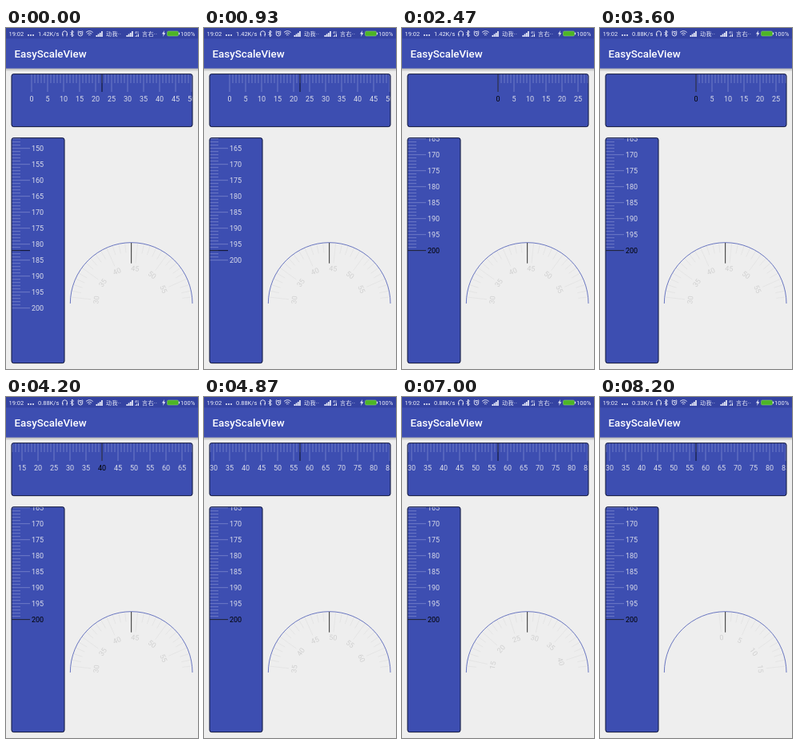
Write an HTML page that moves like this. It is 240 px wide and 427 px high and loops after 8870 ms.

```html
<!DOCTYPE html>
<html lang="en">
<head>
<meta charset="utf-8">
<title>EasyScaleView</title>
<style>
html, body { margin: 0; width: 100%; height: 100%; overflow: hidden; background: #eee; }
svg { display: block; width: 100%; height: 100%; font: 9px Roboto, sans-serif; }
.panel { fill: #3d4eb1; }
.frame { fill: none; stroke: #000; stroke-width: .67; }
.status { font-size: 7.5px; fill: #eceefa; }
.cjk { font-family: Roboto, "Noto Sans CJK SC", "Noto Sans CJK", sans-serif; font-size: 7px; letter-spacing: .4px; }
.icon { fill: none; stroke: #eceefa; stroke-width: .9; }
.ruler line { stroke: #8792d3; stroke-width: .67; }
.ruler text { fill: #dcdeeb; }
.dial line { stroke: #dcdcdc; stroke-width: .5; }
.dial text { fill: #d0d0d0; }
g.on text { fill: #000; }
.needle { stroke: #000; stroke-width: .8; }
</style>
</head>
<body>
<svg viewBox="0 0 240 427">
  <defs>
    <linearGradient id="shade" x2="0" y2="1">
      <stop stop-color="#000" stop-opacity=".24"/><stop offset="1" stop-color="#000" stop-opacity="0"/>
    </linearGradient>
    <clipPath id="clipH"><rect x="6.67" y="57.33" width="226.67" height="66.67" rx="3"/></clipPath>
    <clipPath id="clipV"><rect x="6.67" y="137.33" width="66.67" height="282.67" rx="3"/></clipPath>
    <clipPath id="clipD"><rect x="79" y="267" width="156" height="79"/></clipPath>
  </defs>

  <rect width="240" height="50.67" fill="#3d4eb1"/>
  <rect width="240" height="13.33" fill="#3443a2"/>
  <rect y="50.67" width="240" height="4" fill="url(#shade)"/>
  <text x="10.5" y="37" font-size="13.33" font-weight="500" fill="#fff">EasyScaleView</text>

  <g class="status">
    <text x="3.5" y="10">19:02</text>
    <circle cx="28" cy="9" r="1"/><circle cx="31" cy="9" r="1"/><circle cx="34" cy="9" r="1"/>
    <text x="40" y="10" id="speed"></text>
    <g class="icon">
      <path d="M70.5 9V7a3 3.2 0 0 1 6 0v2M71 7.5v3M76 7.5v3"/>
      <path d="M80.5 5l4 4-2 2V3l2 2-4 4"/>
      <circle cx="93" cy="7.2" r="2.8"/><path d="M93 5.5v2h1.5M89.5 5l1.6-1.5M96.5 5l-1.6-1.5"/>
      <path d="M100 5.5q4.3-3.6 8.600 0M101.5 7.3q2.8-2.4 5.6 0M103 9q1.3-1.1 2.6 0"/>
    </g>
    <path id="bars" d="M112.500 11v-2h1.700v2zM114.700 11v-3.500h1.700v3.500zM116.900 11v-5h1.700v5zM119.100 11v-7h1.700v7z"/>
    <text x="125" y="10" class="cjk">动我··</text>
    <use href="#bars" x="38"/>
    <text x="161" y="6.5" font-size="4">4G</text>
    <path d="M161.500 11v-1.200h1v1.200zM163.200 11v-2.400h1v2.400zM165 11v-3.600h1v3.600z"/>
    <text x="170" y="10" class="cjk">言右··</text>
    <path d="M198 3l-3 4.500h2l-1 3.500 3.300-4.700h-2z"/>
    <rect x="201.500" y="4" width="14" height="6" rx="1.500" fill="#4db526" stroke="#93d07c" stroke-width=".5"/>
    <rect x="216" y="5.700" width="1" height="2.600"/>
    <text x="218" y="10">100%</text>
  </g>

  <rect class="panel" x="6.67" y="57.33" width="226.67" height="66.67" rx="3"/>
  <g clip-path="url(#clipH)"><g id="across" class="ruler"></g></g>
  <path class="needle" d="M120 58V80"/>
  <rect class="frame" x="7" y="57.67" width="226" height="66" rx="2.7"/>

  <rect class="panel" x="6.67" y="137.33" width="66.67" height="282.67" rx="3"/>
  <g clip-path="url(#clipV)"><g id="down" class="ruler"></g></g>
  <path class="needle" d="M7.300 278.670H30"/>
  <rect class="frame" x="7" y="137.670" width="66" height="282" rx="2.7"/>

  <g clip-path="url(#clipD)"><g id="dial" class="dial"></g></g>
  <path d="M80.330 345a76.330 76.330 0 0 1 152.670 0" fill="none" stroke="#3d4eb1" stroke-width=".75"/>
  <path class="needle" d="M156.670 269V294.700"/>
</svg>

<script>
const LOOP = 8870, STEP = 200 / 3;
const $ = id => document.getElementById(id);

const easeIn = u => u * u;
const easeOut = u => 1 - (1 - u) ** 2;
const easeBoth = u => u * u * (3 - 2 * u);

// Each move: start ms, end ms, value reached, easing
const moves = {
  across: [22, [1950, 2467, 0, easeIn], [2870, 3270, -12, easeBoth], [3270, 3535, 0, easeBoth],
    [3600, 4000, 27, easeBoth], [4133, 4400, 57, easeOut]],
  down: [182, [600, 1270, 212, easeBoth], [1467, 1867, 200, easeOut]],
  dial: [44, [4800, 5067, 55, easeOut], [5200, 5600, 65, easeOut], [5867, 6133, 50, easeOut],
    [6400, 6667, 35, easeOut], [6933, 7200, 19.4, easeOut], [7533, 7800, 1, easeOut]]
};

// Scales move by whole units
function valueAt([value, ...list], t) {
  for (const [start, end, goal, ease] of list) {
    if (t <= start) break;
    value += (goal - value) * ease(Math.min(1, (t - start) / (end - start)));
  }
  return Math.round(value);
}

function buildMarks(id, max, draw) {
  let html = "";
  for (let v = 0; v <= max; v++) html += `<g>${draw(v, v % 5 === 0)}</g>`;
  $(id).innerHTML = html;
  return [...$(id).children];
}

const marks = {
  across: buildMarks("across", 100, (v, major) => {
    const x = 120 + v * 4;
    return `<line x1="${x}" x2="${x}" y1="58" y2="${major ? 80 : 69}"/>` +
      (major ? `<text x="${x}" y="92.3" text-anchor="middle">${v}</text>` : "");
  }),
  down: buildMarks("down", 200, (v, major) => {
    const y = 278.67 + v * 4;
    return `<line x1="7.3" x2="${major ? 30 : 18}" y1="${y}" y2="${y}"/>` +
      (major ? `<text x="32" y="${y + 3.1}">${v}</text>` : "");
  }),
  dial: buildMarks("dial", 100, (v, major) =>
    `<line y1="-76" y2="${major ? -51 : -64}"/>` +
    (major ? `<text y="-41" text-anchor="middle">${v}</text>` : ""))
};

function draw(now) {
  const t = Math.floor((now % LOOP + 4) / STEP) * STEP;
  const value = {};
  for (const id in moves) {
    value[id] = valueAt(moves[id], t);
    marks[id].forEach((g, v) => g.classList.toggle("on", v === value[id]));
  }
  $("across").setAttribute("transform", `translate(${-4 * value.across})`);
  $("down").setAttribute("transform", `translate(0 ${-4 * value.down})`);
  marks.dial.forEach((g, v) => {
    const offset = v - value.dial;
    g.style.display = Math.abs(offset) < 15 ? "" : "none";
    g.setAttribute("transform", `translate(156.67 345) rotate(${offset * 6})`);
  });
  $("speed").textContent = (t < 3060 ? "1.42" : t < 7060 ? "0.88" : "0.33") + "K/s";
}

const began = performance.now();
function tick() {
  draw(performance.now() - began);
  requestAnimationFrame(tick);
}
tick();
</script>
</body>
</html>
```
